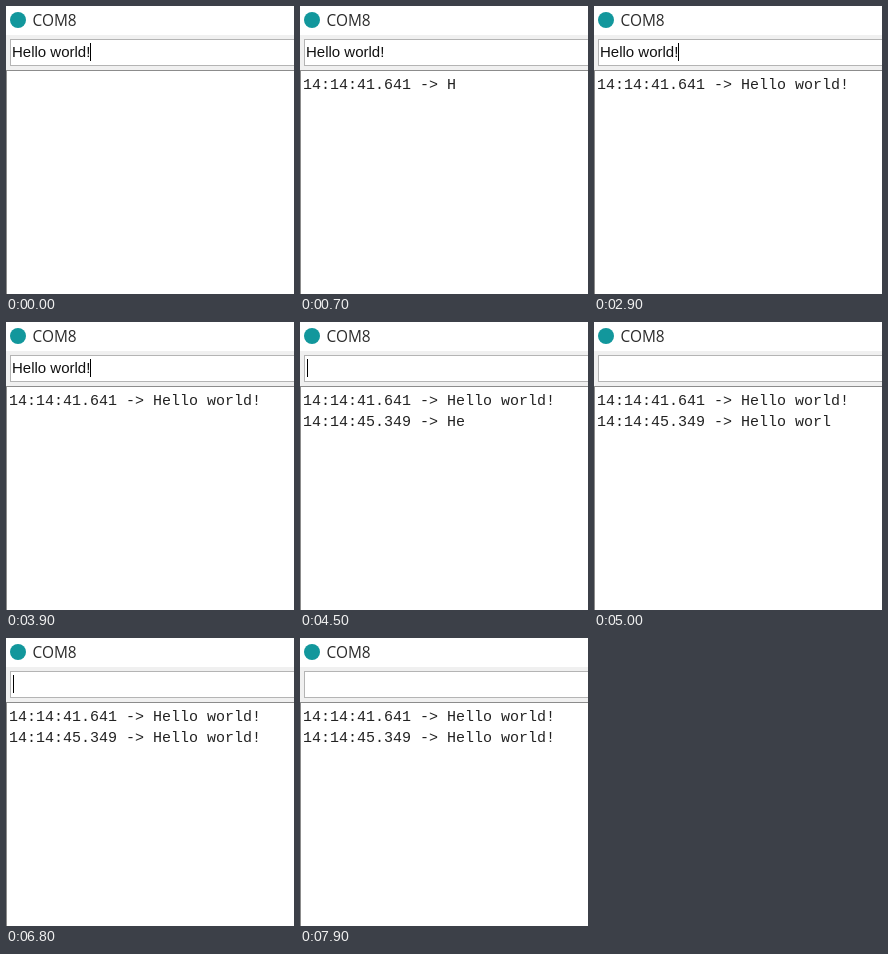
An HTML page for the animation above (8000 ms loop, 288 px wide and 288 px high).

```html
<!DOCTYPE html>
<html lang="en">
<head>
<meta charset="utf-8">
<title>Serial monitor</title>
<style>
  html, body { margin: 0; width: 100%; height: 100%; overflow: hidden; background: #fff; }
  svg { display: block; width: 100vw; height: 100vh; }
  text { white-space: pre; }
  .title { font: 15.4px "Open Sans", "Noto Sans", sans-serif; fill: #2b2b2b; }
  .field { font: 15px "Liberation Sans", Arial, sans-serif; fill: #111; }
  .log { font: 15px "Liberation Mono", "Courier New", monospace; fill: #222; }
</style>
</head>
<body>
<svg viewBox="0 0 288 288">
  <rect width="288" height="288" fill="#fff"/>
  <circle cx="12" cy="14" r="8" fill="#12979c"/>
  <text class="title" x="26.5" y="20">COM8</text>

  <rect y="29" width="288" height="36" fill="#f0f0f0"/>
  <rect x="4.5" y="33.5" width="300" height="26" fill="#fff" stroke="#b4b4b4"/>
  <text class="field" id="field" x="6" y="51"></text>
  <rect id="caret" y="37" width="1" height="18" fill="#000"/>

  <rect x="0.5" y="64.5" width="300" height="240" fill="#fff" stroke="#8c8c8c"/>
  <text class="log" id="first" x="3" y="83"></text>
  <text class="log" id="second" x="3" y="104"></text>
</svg>
<script>
  const LOOP = 8000, TICK = 100, BLINK = 500, SENT = 4400;
  const MESSAGE = "Hello world!";
  const rows = [
    { id: "first", stamp: "14:14:41.641 -> ", start: 700 },
    { id: "second", stamp: "14:14:45.349 -> ", start: SENT },
  ];
  const el = id => document.getElementById(id);

  // Characters arrive three for every two ticks.
  function received({ stamp, start }, time) {
    if (time < start) return "";
    const ticks = Math.floor((time - start) / TICK);
    return stamp + MESSAGE.slice(0, 1 + Math.floor(ticks * 1.5));
  }

  function caretVisible(time) {
    const phase = time < SENT ? time + 100 : time - SENT;
    return Math.floor(phase / BLINK) % 2 === 0;
  }

  function draw(time) {
    const sent = time >= SENT;
    el("field").textContent = sent ? "" : MESSAGE;
    el("caret").setAttribute("x", sent ? 7 : 84);
    el("caret").setAttribute("visibility", caretVisible(time) ? "visible" : "hidden");
    for (const row of rows) el(row.id).textContent = received(row, time);
  }

  const begin = performance.now();
  function frame() {
    draw((performance.now() - begin) % LOOP);
    requestAnimationFrame(frame);
  }
  frame();
</script>
</body>
</html>
```
